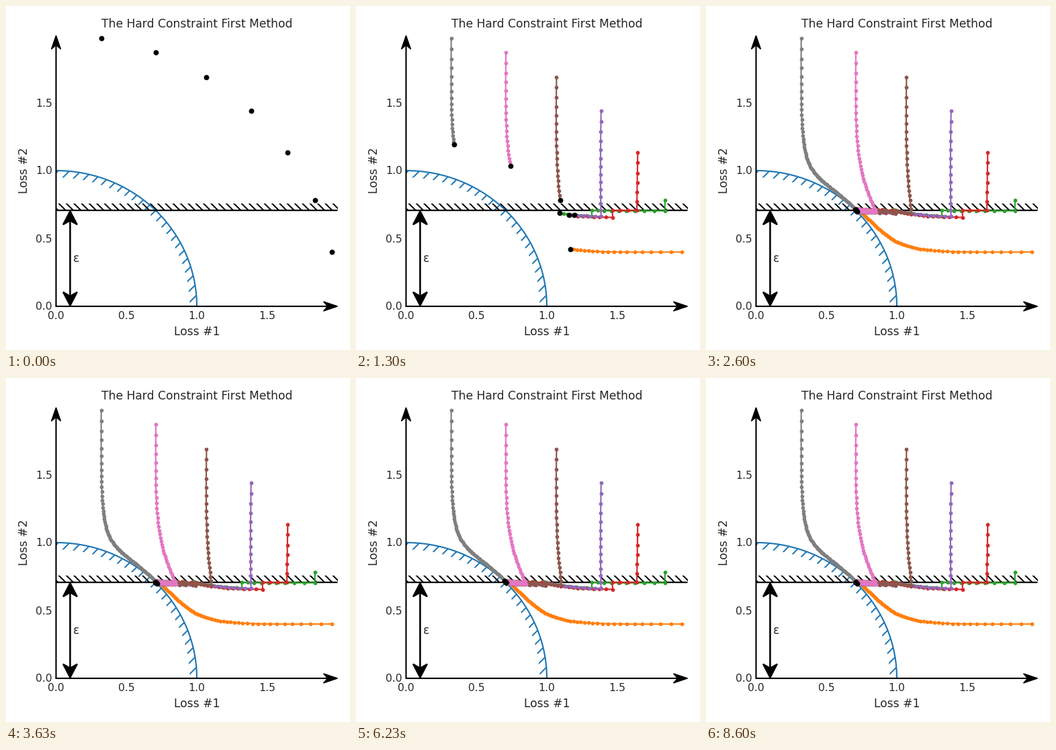
A matplotlib script for the animation above (8830 ms loop, 512 by 512 pixels).

```python
import numpy as np
import matplotlib.pyplot as plt
from matplotlib.animation import FuncAnimation
from matplotlib.patches import Polygon

SIZE, INCHES = 512, 5
FRAMES, LOOP = 265, 8830
HOLD, STEPS, PER_FRAME = 30, 400, 2
RATE = 0.02
EPS = np.sqrt(0.5)
INK = "#262626"
BLUE = "C0"

plt.rcParams["font.family"] = "DejaVu Sans"
plt.rcParams["hatch.linewidth"] = 1.4


def px(x, y):
    """Loss values to stage pixels."""
    return 74.5 + 209.5 * np.asarray(x), 447.0 - 202 * np.asarray(y)


def descend(angle):
    """Reduce loss 2 while it breaks the limit, otherwise loss 1."""
    s, a = 1.0, angle
    path = []
    for _ in range(STEPS + 1):
        r = 1 + s * s
        x, y = r * np.cos(a), r * np.sin(a)
        path.append((x, y))
        if y > EPS:
            ds, da = 2 * s * np.sin(a), x
        else:
            ds, da = 2 * s * np.cos(a), -y
        s, a = s - RATE * ds, a - RATE * da
    return px(*np.array(path).T)


fig = plt.figure(figsize=(INCHES, INCHES), dpi=SIZE / INCHES,
                 facecolor="white")
ax = fig.add_axes([0, 0, 1, 1])
ax.set_xlim(0, SIZE)
ax.set_ylim(SIZE, 0)
ax.axis("off")


def line(x, y, color="k", width=1.5):
    ax.plot(x, y, color=color, lw=width, solid_capstyle="butt", zorder=2,
            snap=False)


def band(points, color, hatch):
    ax.add_patch(Polygon(points, fill=False, edgecolor=color, lw=0,
                         hatch=hatch, zorder=1))


def head(x, y, dx, dy, length, half, edge=1):
    """Notched arrowhead with its tip at (x, y), pointing along (dx, dy)."""
    spots = [(0, 0), (length, half), (0.7 * length, 0), (length, -half)]
    pts = [(x - b * dx - w * dy, y - b * dy + w * dx) for b, w in spots]
    ax.add_patch(Polygon(pts, color="k", lw=edge, joinstyle="miter",
                         zorder=3))


def label(x, y, text, size=12, ha="center", **kw):
    ax.text(x, y, text, fontsize=size, color=INK, ha=ha, va="baseline", **kw)


left, base = px(0, 0)
right, top = px(2, 2)

# feasible front
t = np.linspace(0, np.pi / 2, 120)
outer = np.column_stack(px(np.cos(t), np.sin(t)))
inner = np.column_stack(px(0.95 * np.cos(t), 0.95 * np.sin(t)))
band(np.vstack([outer, inner[::-1]]), BLUE, "//")
line(*outer.T, color=BLUE)

# limit on loss 2
limit = px(0, EPS)[1]
edge = px(0, EPS + 0.05)[1]
band([(left, limit), (right, limit), (right, edge), (left, edge)],
     "k", "\\\\\\")
line([left, right], [limit, limit])

# axes and the epsilon arrow
line([left, right - 10], [base, base])
line([left, left], [base + 1, top + 10])
head(right, base, 1, 0, 21, 7)
head(left, top + 1, 0, -1, 20.2, 7)
ex = px(0.1, 0)[0]
line([ex, ex], [limit + 10, base - 10], width=1.8)
head(ex, limit + 1, 0, -1, 20.2, 10.5, edge=1.5)
head(ex, base - 1, 0, 1, 20.2, 10.5, edge=1.5)

for v in (0, 0.5, 1, 1.5):
    x, y = px(v, v)
    label(x, 465.5, f"{v:.1f}", 11)
    label(69, y + 5.5, f"{v:.1f}", 11, ha="right")
label(284, 32, "The Hard Constraint First Method")
label(284, 490, "Loss #1")
label(32, 245, "Loss #2", rotation=90, rotation_mode="anchor")
label(99.6, 381, "ε", ha="left")

paths = [descend(k * np.pi / 15.6) for k in range(1, 8)]
trails = [ax.plot([], [], ".-", color=f"C{k}", lw=1.5, ms=6, mew=1,
                  snap=False, zorder=4 + 0.1 * k)[0] for k in range(1, 8)]
dots, = ax.plot([], [], "o", color="k", ms=5.5, mew=0, snap=False, zorder=6)


def draw(frame):
    n = int(np.clip(PER_FRAME * (frame - HOLD), 0, STEPS))
    for trail, (x, y) in zip(trails, paths):
        trail.set_data(x[:n + 1], y[:n + 1])
    dots.set_data([p[0][n] for p in paths], [p[1][n] for p in paths])
    return trails + [dots]


anim = FuncAnimation(fig, draw, frames=FRAMES, interval=LOOP / FRAMES,
                     repeat=True, repeat_delay=0, blit=False)
plt.show()
```
